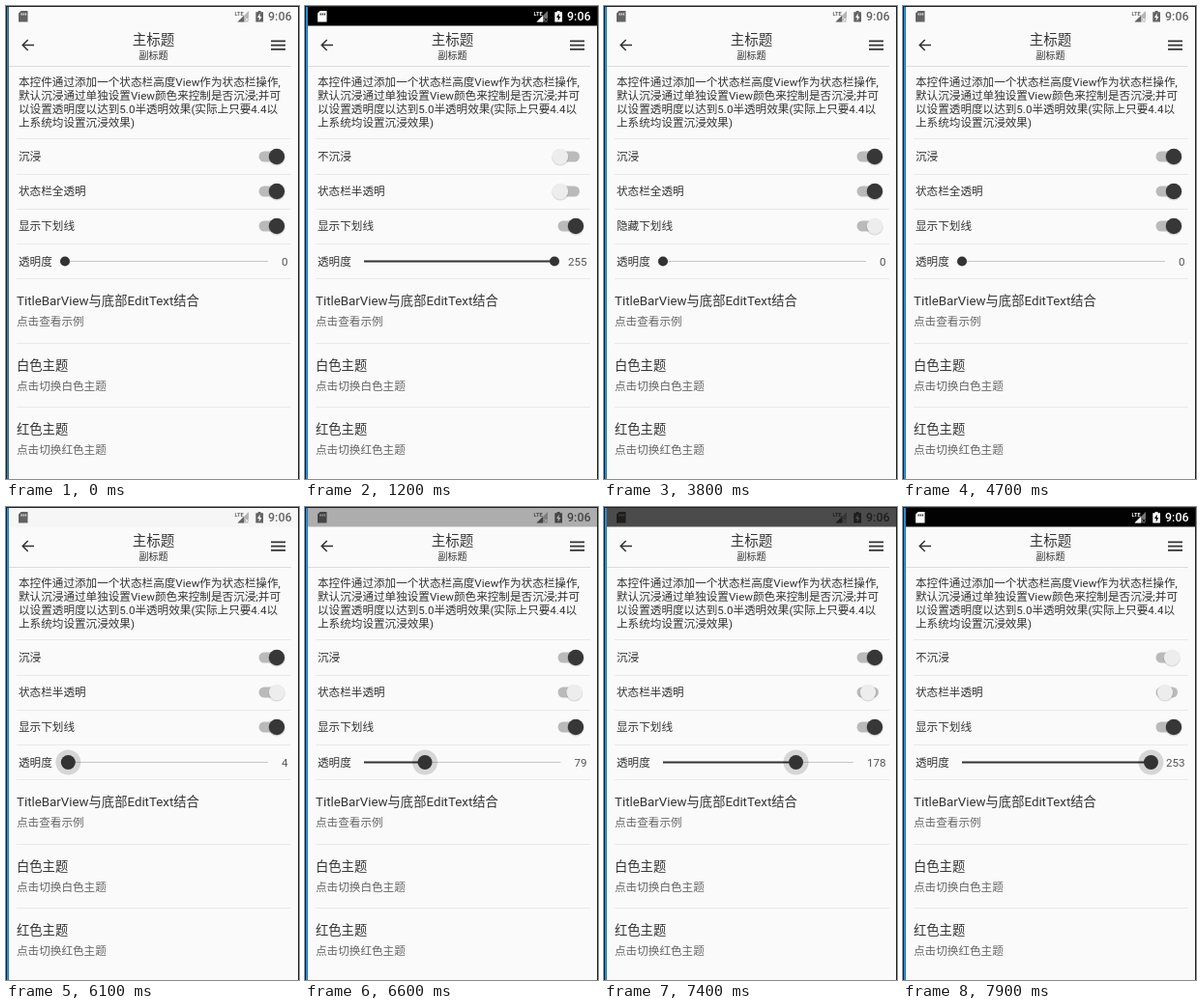
An HTML page for the animation above (8000 ms loop, 303 by 490 pixels).

```html
<!DOCTYPE html>
<html lang="zh-CN">
<head>
<meta charset="utf-8">
<title>主标题</title>
<style>
html, body { margin: 0; width: 100%; height: 100%; overflow: hidden; background: #fafafa; }
svg { display: block; width: 303px; height: 490px; }
text { font-family: Roboto, "Noto Sans CJK SC", "Noto Sans CJK", sans-serif; font-size: 11.6px; fill: #333; }
.title { font-size: 14.5px; text-anchor: middle; }
.small { font-size: 10px; text-anchor: middle; }
.head { font-size: 13.3px; }
.sub { fill: #666; }
.end { text-anchor: end; fill: #555; }
</style>
</head>
<body>
<svg id="stage" viewBox="0 0 303 490">
  <rect width="303" height="490" fill="#fafafa"/>
  <rect id="bar" x="3" y="1" width="299" height="19.5"/>
  <g id="icons">
    <path fill-rule="evenodd" d="M15.5 5H22.5V16.5H13V7.5ZM15.6 7.4V9.6H16.7V7.4ZM17.7 7.4V9.6H18.8V7.4ZM19.8 7.4V9.6H20.9V7.4Z"/>
    <text x="236.5" y="10" style="font-size:5.6px;font-weight:700;fill:inherit">LTE</text>
    <path d="M251 5V16.5H239.5Z" opacity=".45"/>
    <path d="M246 10V16.5H239.5Z"/>
    <path d="M247.5 12.5l3.5 3.5m0-3.5l-3.5 3.5" stroke="currentColor"/>
    <path fill-rule="evenodd" d="M260.7 5H263.5V6.2H266V16.5H258.3V6.2H260.7ZM262.7 7.6L260 12H261.7V15.4L264.4 10.9H262.7Z"/>
    <text x="295.5" y="15.3" style="font-size:12.4px;font-weight:500;text-anchor:end;fill:inherit">9:06</text>
  </g>
  <path d="M29 40.5H17.5M22.7 35L17.2 40.5L22.7 46" fill="none" stroke="#333" stroke-width="1.5"/>
  <path d="M274 36.3H289M274 40.6H289M274 44.9H289" stroke="#333" stroke-width="1.7"/>
  <g id="page"></g>
  <g id="live"></g>
  <path d="M0 .5H303M302.5 0V490" stroke="#222"/>
  <rect width="1.2" height="490" fill="#15202a"/>
  <rect id="edge" x="1.2" y="1" width="1.8" height="489"/>
</svg>
<script>
const LOOP = 8000, LEFT = 61;
const $ = id => document.getElementById(id);

function add(parent, tag, attrs, content = '') {
  const el = document.createElementNS('http://www.w3.org/2000/svg', tag);
  set(el, attrs);
  el.textContent = content;
  return parent.appendChild(el);
}
function set(el, attrs) {
  for (const key in attrs) el.setAttribute(key, attrs[key]);
}
const label = (x, mid, content, cls = '', size = 11.6, parent = $('page')) =>
  add(parent, 'text', { x, y: mid + size * .38, class: cls }, content);
const rule = (y, x = 11, color = '#e9e9e9') =>
  add($('page'), 'path', { d: `M${x} ${y}.5H295`, stroke: color });

label(152.5, 34, '主标题', 'title', 14.5);
label(152.5, 51, '副标题', 'small', 10);
rule(62, 3, '#dcdcdc');
['本控件通过添加一个状态栏高度View作为状态栏操作,',
 '默认沉浸通过单独设置View颜色来控制是否沉浸;并可',
 '以设置透明度以达到5.0半透明效果(实际上只要4.4以',
 '上系统均设置沉浸效果)'].forEach((line, i) => label(13, 78.3 + i * 14, line));
[137, 174, 210, 246, 282, 349, 415].forEach(y => rule(y));
label(13, 265, '透明度');
[['TitleBarView与底部EditText结合', '点击查看示例'],
 ['白色主题', '点击切换白色主题'],
 ['红色主题', '点击切换红色主题']].forEach(([head, sub], i) => {
  label(11, 305.3 + i * 66.5, head, 'head', 13.3);
  label(11, 327 + i * 66.5, sub, 'sub');
});

// Tables of [time, value]; a gap of 1 ms is a hard change.
const alphaSteps = [[899, 0], [900, 255], [2899, 255], [2900, 0], [6099, 0], [6100, 4],
  [6600, 79], [7400, 178], [7900, 253]];
const lightSteps = [[900, 0], [1200, 1], [2900, 1], [3100, 0], [7700, 0], [7900, 1]];
const switches = [
  { y: 156, on: '沉浸', off: '不沉浸', flips: [900, 2900, 7800],
    move: [[900, 280], [1200, 264], [2900, 264], [3100, 280], [7800, 280], [7900, 278]] },
  { y: 192, on: '状态栏全透明', off: '状态栏半透明', flips: [900, 2900, 6100],
    move: [[900, 280], [1200, 264], [2900, 264], [3100, 280], [6100, 280], [6600, 278.5],
      [7400, 273], [7900, 271]] },
  { y: 228, on: '显示下划线', off: '隐藏下划线', flips: [3800, 4500],
    move: [[3800, 280], [4000, 264], [4500, 264], [4700, 280]] }
];

function at(steps, t) {
  const i = steps.findIndex(s => s[0] >= t);
  if (i < 0) return steps[steps.length - 1][1];
  if (i === 0) return steps[0][1];
  const [t0, v0] = steps[i - 1], [t1, v1] = steps[i];
  return v0 + (v1 - v0) * (t - t0) / (t1 - t0);
}

const live = $('live');
for (const s of switches) {
  s.text = label(13, s.y, '', '', 11.6, live);
  add(live, 'rect', { x: 261.5, y: s.y - 5.5, width: 22.5, height: 11, rx: 5.5, fill: '#bababa' });
  s.shade = add(live, 'circle', { cy: s.y + .8, r: 8.8, fill: '#000', opacity: .12 });
  s.thumb = add(live, 'circle', { cy: s.y, r: 8.2 });
}
const track = add(live, 'path', { stroke: '#c6c6c6' });
const fill = add(live, 'path', { stroke: '#333', 'stroke-width': 2 });
const halo = add(live, 'circle', { cy: 264.5, r: 13, fill: '#000' });
const knob = add(live, 'circle', { cy: 264.5, fill: '#333' });
const value = label(291.5, 265, '', 'end', 11.6, live);

function draw(t) {
  const alpha = Math.round(at(alphaSteps, t));
  const shade = Math.round(250 * (1 - alpha / 255));
  const light = at(lightSteps, t), v = Math.round(255 * light);
  const pressed = t >= 6100;
  const bg = `rgb(${shade},${shade},${shade})`;
  set($('bar'), { fill: bg });
  set($('icons'), { fill: `rgb(${v},${v},${v})`, opacity: .6 + .4 * light, color: bg });
  set($('edge'), { fill: t < 900 ? '#2b7193' : '#1686d0' });

  for (const s of switches) {
    const on = s.flips.filter(f => f <= t).length % 2 === 0;
    const cx = at(s.move, t);
    s.text.textContent = on ? s.on : s.off;
    set(s.thumb, { cx, fill: on ? '#373737' : '#ededed' });
    set(s.shade, { cx });
  }

  const end = 271 - 6.5 * (String(alpha).length - 1);
  const x = LEFT + (end - LEFT) * alpha / 255;
  set(track, { d: `M${LEFT} 264.5H${end}` });
  set(fill, { d: `M${LEFT} 264.5H${x}` });
  set(halo, { cx: x, opacity: pressed ? .14 : 0 });
  set(knob, { cx: x, r: pressed ? 7.5 : 5 });
  value.textContent = alpha;
}

function tick(now) {
  draw(Math.floor(now % LOOP / 100) * 100);
  requestAnimationFrame(tick);
}
draw(0);
requestAnimationFrame(tick);
</script>
</body>
</html>
```
